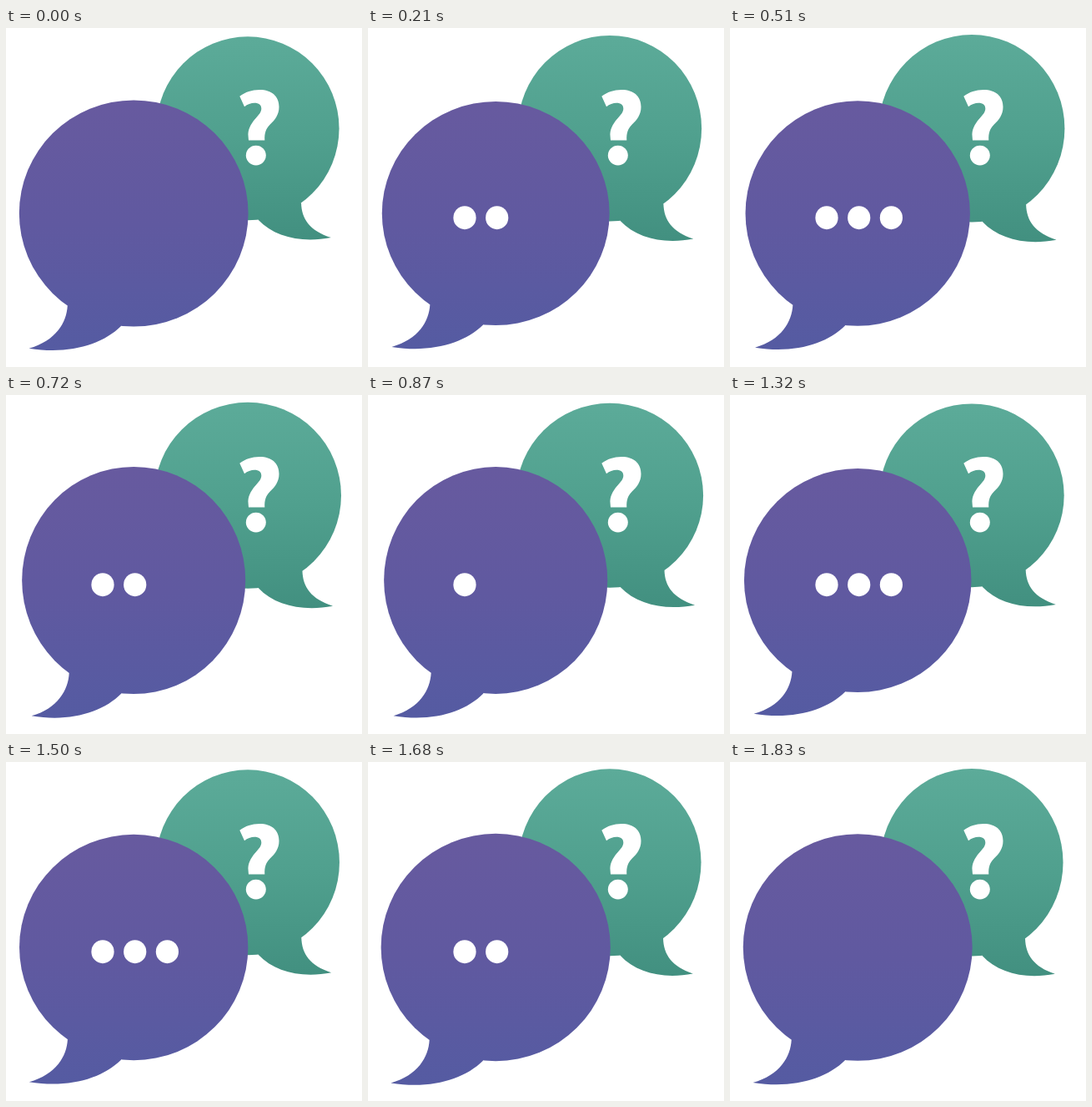
An HTML page with a canvas that plays this animation: 427 px wide and 406 px high, repeating every 1860 ms.

```html
<!DOCTYPE html>
<html lang="en">
<head>
<meta charset="utf-8">
<title>Chat bubbles</title>
<style>
  html, body { margin: 0; width: 100%; height: 100%; overflow: hidden; background: #fff; }
  canvas { display: block; }
</style>
</head>
<body>
<canvas id="stage" width="427" height="406"></canvas>
<script>
const ctx = document.getElementById('stage').getContext('2d');
const LOOP = 1860, STEP = 30;
const TYPING = 930, DOT_GAP = 95, LAST_OFF = 890;

const purple = {
  x: 153.2, y: 222, rx: 137, ry: 135,
  colors: ['#675a9f', '#6059a0', '#555ba2'],
  tail: new Path2D('M-79.2 110 C-80.2 130 -93 152 -125.3 161 C-78 168.5 -38 157 -15.2 134.5 L-15.2 100 Z')
};
const green = {
  x: 290, y: 120.3, rx: 109, ry: 110.5,
  colors: ['#5cab99', '#50a08e', '#429080'],
  tail: new Path2D('M63.7 89.5 C64.2 109 74 123 99.3 131.3 C65 138 32 131 12.5 110 L12 80 Z')
};
const hook = new Path2D('M280.3 81.7 C287 76.8 295 74 304 74 C319 74 327.5 82 327.5 94.5 ' +
  'C327.5 104 322.5 110 317 115.3 C311.8 120.5 309.8 126 310.3 134.5 L291 134.5 ' +
  'L290.6 130 C289.8 122 293.2 115.5 299.2 108.5 C303.7 103.5 306.3 100.5 306.3 96.5 ' +
  'C306.3 92 303.3 89.7 298 89.7 C294 89.7 289.5 91.2 286 94.2 Z');

function wave(t, mid, size, period, peak) {
  return mid + size * Math.cos(2 * Math.PI * (t - peak) / period);
}

function ellipse(x, y, rx, ry) {
  ctx.beginPath();
  ctx.ellipse(x, y, rx, ry, 0, 0, Math.PI * 2);
  ctx.fill();
}

function bubble(b, rx, ry) {
  ctx.save();
  ctx.translate(b.x, b.y);
  ctx.scale(rx / b.rx, ry / b.ry);
  const fill = ctx.createLinearGradient(0, -b.ry, 0, b.ry * 1.2);
  b.colors.forEach((color, i) => fill.addColorStop(i / 2, color));
  ctx.fillStyle = fill;
  ellipse(0, 0, b.rx, b.ry);
  ctx.fill(b.tail);
  ctx.restore();
}

function draw(t) {
  ctx.fillStyle = '#fff';
  ctx.fillRect(0, 0, 427, 406);

  bubble(green, wave(t, 110.8, 1.3, LOOP, 830), wave(t, 110.9, 1.4, 1340, 480));
  ctx.fillStyle = '#fff';
  ctx.fill(hook);
  ellipse(299.8, 152.6, 12, 11.8);

  bubble(purple, wave(t, 135.8, 1.8, LOOP, -150), wave(t, 135, 1.2, TYPING, 775));
  ctx.fillStyle = '#fff';

  // Dots appear left to right and leave right to left.
  const beat = t % TYPING;
  for (let i = 0; i < 3; i++) {
    if (beat >= DOT_GAP * (i + 1) && beat < LAST_OFF - DOT_GAP * i) {
      ellipse(116 + 38.7 * i, 227.2, 13.6, 14);
    }
  }
}

function tick() {
  const t = performance.now() % LOOP;
  draw(Math.floor(t / STEP) * STEP);
  requestAnimationFrame(tick);
}
tick();
</script>
</body>
</html>
```
